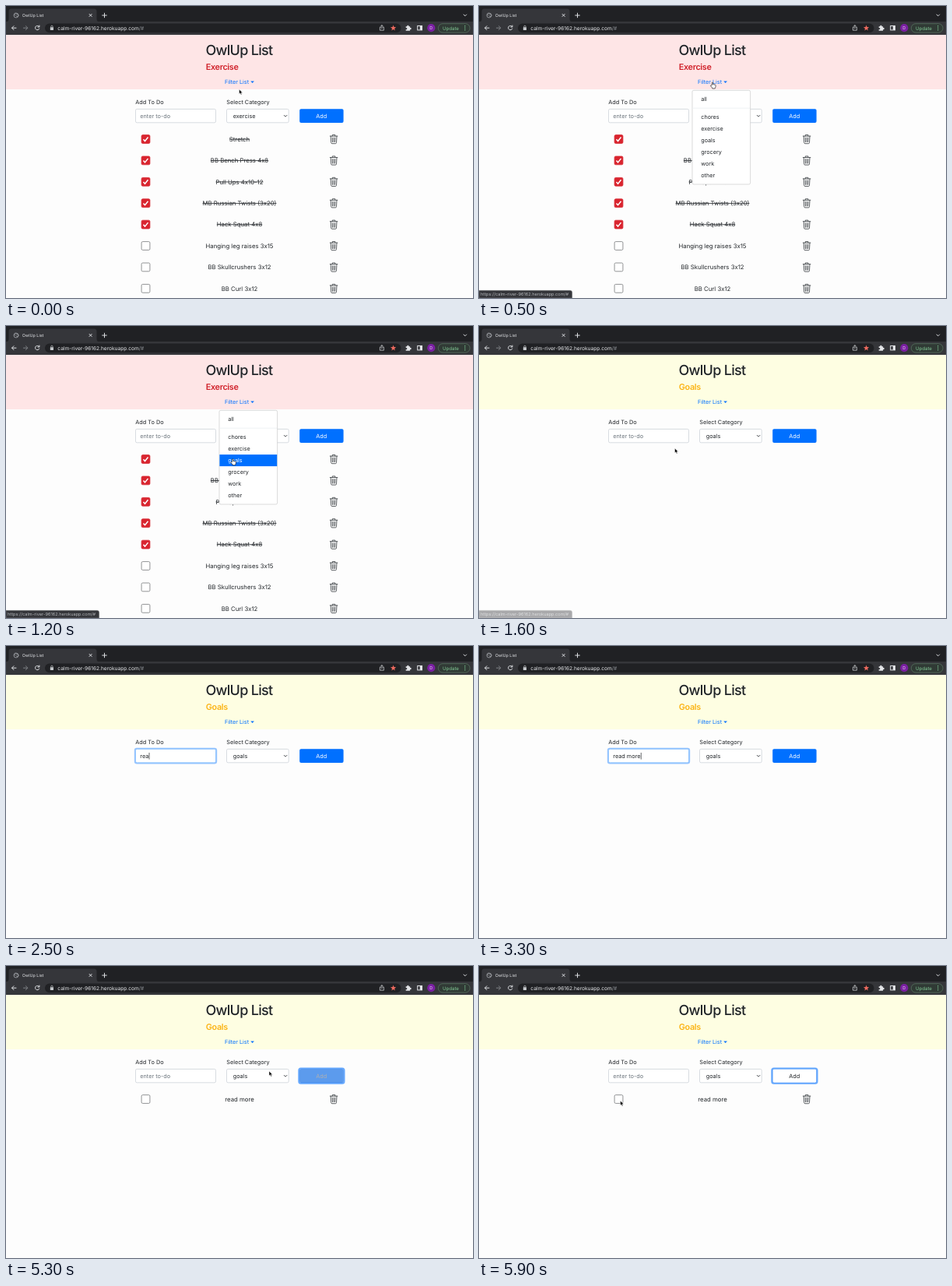
Animation, 600 px wide and 375 px high, one loop 6000 ms. Source, as an HTML page:

```html
<!DOCTYPE html>
<html lang="en">
<head>
<meta charset="utf-8">
<title>OwlUp List</title>
<style>
  html, body { margin: 0; width: 100%; height: 100%; overflow: hidden; background: #fdfdfd; }
  svg { display: block; width: 100vw; height: 100vh; }
  text { font-family: Inter, "Open Sans", sans-serif; font-size: 7.3px; fill: #212529;
         white-space: pre; text-rendering: geometricPrecision; }
  .mid { text-anchor: middle; }
  .row { font-size: 7.75px; text-anchor: middle; }
  .done { text-decoration: line-through; }
  .line { fill: none; stroke: #dcdee1; stroke-width: 1; stroke-linecap: round; stroke-linejoin: round; }
  .field { fill: #fff; stroke: #ced4da; stroke-width: .8; }
  .ring { fill: none; stroke: #0070ff; stroke-opacity: .4; stroke-width: 1.8; }
  .bin { fill: none; stroke: #43474b; stroke-width: .85; stroke-linecap: round; }
</style>
</head>
<body>
<svg id="stage" viewBox="0 0 600 375" preserveAspectRatio="none">
  <rect width="600" height="375" fill="#fdfdfd"/>

  <!-- browser bar -->
  <rect width="600" height="37.2" fill="#35363a"/>
  <rect width="600" height="20" fill="#202124"/>
  <path d="M0 20.2q3.500 0 3.500-3.500V7q0-3.500 3.500-3.500H113q3.500 0 3.500 3.500v9.700q0 3.500 3.500 3.500z" fill="#35363a"/>
  <g class="line" stroke-width=".8">
    <circle cx="13" cy="12" r="3" stroke="#a5a8ac" style="stroke:#a5a8ac;stroke-width:.8"/>
    <path d="M10.500 11q2 .2 2.500 1.500t2.300 1M12 9.300q.8 1.400 3 1.300" style="stroke:#a5a8ac;stroke-width:.7"/>
    <path d="M107 10.300l3.200 3.200M110.200 10.300l-3.200 3.200M126.500 9.200v5.600M123.700 12h5.600M588 11l1.800 1.800 1.800-1.800"/>
    <path d="M13 28.200H7.700M10 25.700l-2.500 2.500 2.500 2.500"/>
    <path d="M22.500 28.200h5.200M25.400 25.700l2.500 2.500-2.500 2.500" style="stroke:#7d8084"/>
    <path d="M42.600 26.600a2.700 2.700 0 1 0 .2 2.500M42.900 25v2h-2"/>
  </g>
  <rect x="50" y="22.600" width="457.500" height="11.600" rx="5.800" fill="#202124"/>
  <rect x="56.800" y="27.300" width="4.200" height="3.600" rx=".5" fill="#c4c7ca"/>
  <path class="line" d="M57.700 27.300v-.9a1.200 1.200 0 0 1 2.400 0v.9" style="stroke:#c4c7ca;stroke-width:.7"/>
  <text x="20.700" y="14.100" style="font-size:5.4px;fill:#e3e5e8">OwlUp List</text>
  <text x="66.300" y="30.600" style="font-size:6.6px;fill:#e8eaed">calm-river-96162.herokuapp.com<tspan fill="#8d9196">/#</tspan></text>
  <g class="line">
    <path d="M481.600 27.200h-1.200v4h5v-4h-1.200M482.900 29v-4.200M481.500 26l1.400-1.400 1.400 1.400" style="stroke-width:.7"/>
  </g>
  <path id="star" fill="#ee6a5f"/>
  <path d="M513.700 26.300h1.700a1.100 1.100 0 1 1 2 0h1.700v1.700a1.100 1.100 0 1 1 0 2v1.800h-5.400v-1.700a1.100 1.100 0 1 0 0-2z" fill="#e3e5e8"/>
  <rect x="528.700" y="25.500" width="5.800" height="5.400" fill="none" stroke="#e3e5e8"/>
  <rect x="531.800" y="25.500" width="2.700" height="5.400" fill="#e3e5e8"/>
  <circle cx="546.300" cy="28.200" r="5.100" fill="#7a1fa2"/>
  <text class="mid" x="546.300" y="30.200" style="font-size:5.4px;fill:#eadcf0">D</text>
  <rect x="555.300" y="22.700" width="40.700" height="11.400" rx="5.700" fill="#303a35" stroke="#587360" stroke-width=".8"/>
  <text x="561" y="30.500" style="font-size:6.1px;fill:#81c995">Update</text>
  <g fill="#81c995"><circle cx="589.700" cy="25.800" r=".7"/><circle cx="589.700" cy="28.300" r=".7"/><circle cx="589.700" cy="30.800" r=".7"/></g>

  <!-- page -->
  <rect id="head" y="37.200" width="600" height="69.800"/>
  <text x="256.500" y="62.800" style="font-size:18px;font-weight:500;letter-spacing:-.04em">OwlUp List</text>
  <text id="kind" x="256.800" y="81.500" style="font-size:10.800px;font-weight:600;letter-spacing:-.03em"></text>
  <text x="281" y="100.300" style="font-size:7.200px;fill:#0070ff">Filter List</text>
  <path d="M314.300 96.500h4.600l-2.300 2.400z" fill="#0070ff"/>
  <text x="166.300" y="126.200">Add To Do</text>
  <text x="283.300" y="126.200">Select Category</text>

  <rect id="inputRing" class="ring" x="165.700" y="131.600" width="104.600" height="19" rx="2.400"/>
  <rect id="input" class="field" x="166.500" y="132.400" width="103" height="17.400" rx="1.800"/>
  <text id="typed" x="172.300" y="143.800"></text>
  <rect id="caret" y="137" width=".7" height="8.600" fill="#212529"/>

  <rect class="field" x="283.500" y="132.400" width="79.700" height="17.400" rx="1.800"/>
  <text id="choice" x="291.700" y="143.800"></text>
  <path class="line" d="M357.200 140.300l1.900 1.900 1.900-1.900" style="stroke:#43474b;stroke-width:.9"/>

  <rect id="addRing" class="ring" x="376.200" y="131.300" width="58.400" height="19.600" rx="2.600" style="stroke-opacity:.6"/>
  <rect id="add" x="377.200" y="132.200" width="56.400" height="17.800" rx="1.900"/>
  <text class="mid" x="405.300" y="143.800" style="fill:#fff">Add</text>
  <g id="addPlain">
    <rect x="377.200" y="132.200" width="56.400" height="17.800" rx="1.900" fill="#fff" stroke="#4a98fb" stroke-width=".6"/>
    <text class="mid" x="405.300" y="143.800">Add</text>
  </g>

  <g id="exercise"></g>
  <g id="goals"></g>

  <g id="menu">
    <rect x="274" y="108.300" width="74.600" height="120.700" rx="1.900" fill="#fff" stroke="#ccc" stroke-width=".7"/>
    <path d="M274.500 131.200h73.600" stroke="#e9ecef" stroke-width=".7"/>
    <rect id="pick" x="274.400" width="73.800" height="15"/>
  </g>

  <g id="status">
    <path d="M0 365.200h117q2.700 0 2.700 2.700V375H0z" fill="#35363a" stroke="#8a8b8d" stroke-width=".4"/>
    <text x="2" y="372.200" style="font-size:5.600px;fill:#b4b7bb">https://calm-river-96162.herokuapp.com/#</text>
  </g>

  <g id="cursor">
    <path id="arrow" d="M0 0V6l1.400-1.200 1 2.200 1.100-.5-1-2.100h1.900z" fill="#000" stroke="#fff" stroke-width=".5"/>
    <path id="hand" d="M-.7 3.800V.7a.7.7 0 0 1 1.400 0v2l2.700.5q.9.2.8 1.100l-.4 2q-.2.600-.5.900v.8H-.2v-.8L-2.400 4.700q-.3-.7.4-.9z" fill="#fff" stroke="#000" stroke-width=".6" stroke-linejoin="round"/>
    <path id="beam" d="M-1.300-3.500q1.300 0 1.300.8 0-.8 1.300-.8M0-2.700v5.400M-1.300 3.500q1.300 0 1.300-.8 0 .8 1.300.8" fill="none" stroke="#222" stroke-width=".6"/>
  </g>
</svg>
<script>
const LOOP = 6000, STEP = 100;
const $ = id => document.getElementById(id);
const show = (id, on) => { $(id).style.opacity = Number(on); };

function make(parent, tag, attrs, text) {
  const el = document.createElementNS('http://www.w3.org/2000/svg', tag);
  for (const k in attrs) el.setAttribute(k, attrs[k]);
  if (text) el.textContent = text;
  parent.appendChild(el);
  return el;
}

function addRow(parent, i, label, done) {
  const g = make(parent, 'g', { transform: `translate(0 ${171 + i * 27.4})` });
  make(g, 'rect', { x: 174.1, y: -5.4, width: 10.8, height: 10.8, rx: 1.5,
    fill: done ? '#d9252f' : '#fff', stroke: done ? '#d9252f' : '#76797c', 'stroke-width': .8 });
  if (done) make(g, 'path', { d: 'M176.500 .2l2 2.300 4-5', fill: 'none', stroke: '#fff', 'stroke-width': 1.5 });
  make(g, 'text', { x: 300, y: 2.8, class: done ? 'row done' : 'row' }, label);
  make(g, 'path', { class: 'bin',
    d: 'M416.300-3.900h9.600M419.300-3.900v-1.600h3.600v1.600M417.200-3.900l.5 8.400q.1 1.200 1.200 1.200h4.400q1.100 0 1.200-1.200l.5-8.400M419.300-1.800l.2 5.400M421.100-1.800v5.400M422.900-1.800l-.2 5.400' });
}

['Stretch', 'BB Bench Press 4x8', 'Pull Ups 4x10-12', 'MB Russian Twists (3x20)', 'Hack Squat 4x8',
 'Hanging leg raises 3x15', 'BB Skullcrushers 3x12', 'BB Curl 3x12']
  .forEach((label, i) => addRow($('exercise'), i, label, i < 5));
addRow($('goals'), 0, 'read more', false);

const items = ['all', 'chores', 'exercise', 'goals', 'grocery', 'work', 'other'].map((label, i) => {
  const y = i ? 142.6 + (i - 1) * 15 : 119.8;
  return { y, el: make($('menu'), 'text', { x: 285.3, y: y + 2.6, style: 'font-size:7.2px' }, label) };
});

$('star').setAttribute('d', 'M' + Array.from({ length: 10 }, (_, i) => {
  const r = i % 2 ? 1.6 : 3.8, a = i * Math.PI / 5;
  return `${497.6 + r * Math.sin(a)} ${28.4 - r * Math.cos(a)}`;
}).join('L') + 'z');

// pointer: time, x, y
const path = [
  [0, 299.5, 107], [200, 300, 99], [500, 300, 98], [700, 296, 122], [900, 292, 160],
  [1100, 291.7, 170.5], [1300, 291, 171], [1400, 283, 169], [1600, 251.5, 157], [1900, 215, 141],
  [3500, 215, 141], [3700, 270, 146], [4000, 378, 143], [4100, 384.5, 142.3], [5000, 384.5, 142.3],
  [5200, 378, 139], [5300, 338, 135], [5500, 265, 139], [5700, 205, 160], [5900, 181.5, 173], [6000, 181.5, 173]
];
const keys = [2200, 2300, 2500, 2600, 2700, 2900, 3000, 3200, 3300];

const MENU = [500, 1300], GOALS = 1300, FOCUS = 2000, CLICK = 4300, ADDED = 4500, LEAVE = 5300;
const within = (t, a, b) => t >= a && t < b;

function pointer(t) {
  const i = path.findIndex(p => p[0] > t), a = path[i - 1], b = path[i];
  const k = (t - a[0]) / (b[0] - a[0]);
  return [a[1] + (b[1] - a[1]) * k, a[2] + (b[2] - a[2]) * k];
}

function render(t) {
  const [x, y] = pointer(t);
  const goals = t >= GOALS, menu = within(t, ...MENU);
  const inside = (l, top, r, bottom) => x >= l && x <= r && y >= top && y <= bottom;
  const onAdd = inside(377, 132, 434, 150);
  const onLink = inside(281, 93, 319, 103) || (menu && inside(274, 108, 349, 229));
  const onInput = inside(166, 132, 270, 150);

  $('head').setAttribute('fill', goals ? '#fefee2' : '#fee5e6');
  $('kind').textContent = goals ? 'Goals' : 'Exercise';
  $('kind').setAttribute('style', $('kind').style.cssText + `;fill:${goals ? '#fbb414' : '#d0222b'}`);
  $('choice').textContent = goals ? 'goals' : 'exercise';
  show('exercise', !goals);
  show('goals', t >= ADDED);

  show('menu', menu);
  const pressed = t >= 1100;
  const hot = items.find(it => Math.abs(y - it.y) < 7.5);
  $('pick').setAttribute('fill', !hot ? 'none' : pressed ? '#0070ff' : '#f0f2f4');
  if (hot) $('pick').setAttribute('y', hot.y - 7.5);
  items.forEach(it => { it.el.style.fill = it === hot && pressed ? '#fff' : '#212529'; });

  const focused = within(t, FOCUS, CLICK);
  const count = t < ADDED ? keys.filter(k => k <= t).length : 0;
  const typed = $('typed');
  typed.textContent = count ? 'read more'.slice(0, count) : 'enter to-do';
  typed.style.fill = count ? '#212529' : '#6c757d';
  show('inputRing', focused);
  $('input').style.stroke = focused ? '#80bdff' : '#ced4da';
  const lastKey = keys[count - 1] || FOCUS;
  $('caret').setAttribute('x', 172.3 + (count ? typed.getComputedTextLength() + .3 : 0));
  show('caret', focused && (t - lastKey) % 1000 < 500);

  $('add').setAttribute('fill', onAdd || t >= CLICK ? '#0062e3' : '#0070ff');
  show('addRing', t >= CLICK);
  show('addPlain', t < LEAVE ? 0 : t < LEAVE + STEP ? .36 : 1);

  show('status', t < 300 ? 0 : t < 1500 ? 1 : Math.max(0, .75 - (t - 1500) / 300));

  show('cursor', !within(t, 2200, 3500));
  $('cursor').setAttribute('transform', `translate(${x} ${y})`);
  const hand = onAdd || onLink;
  show('hand', hand);
  show('beam', onInput && !menu && !hand);
  show('arrow', !hand && !onInput);
}

const start = performance.now();
function tick() {
  const t = (performance.now() - start) % LOOP;
  render(Math.floor(t / STEP) * STEP);
  requestAnimationFrame(tick);
}
render(0);
requestAnimationFrame(tick);
</script>
</body>
</html>
```
